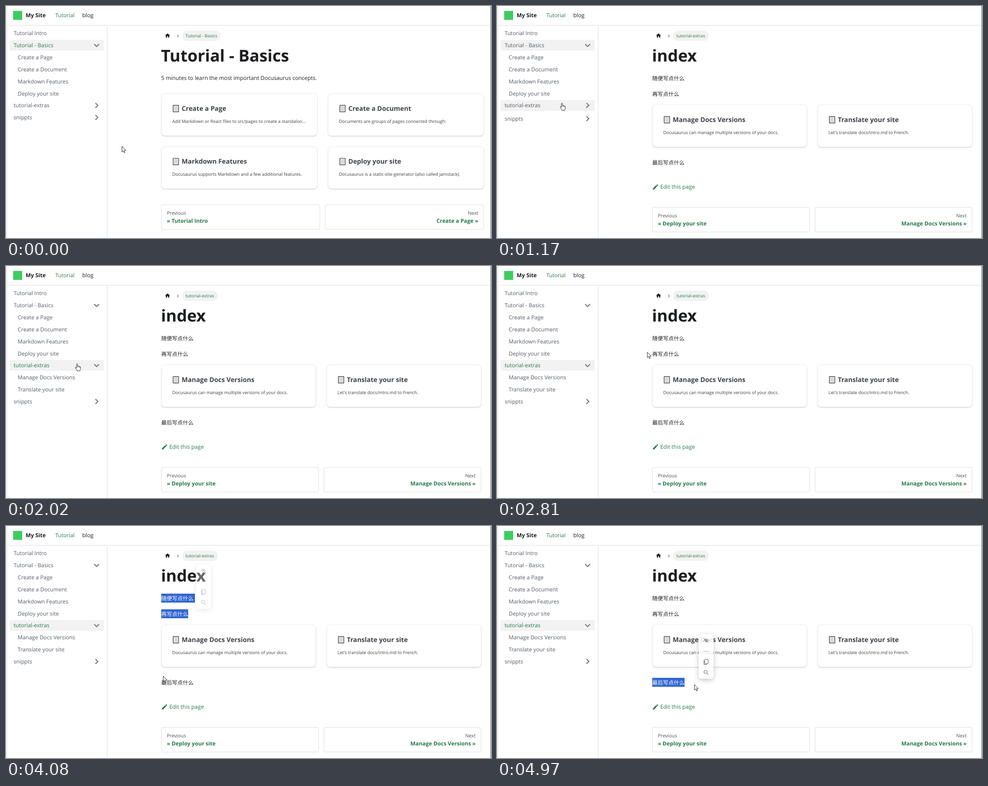
These frames come from a looping animation (1081 px wide and 518 px high, 5.02 s). An HTML page with a canvas:

```html
<!DOCTYPE html>
<html lang="zh-CN">
<head>
<meta charset="utf-8">
<title>My Site</title>
<style>
  html, body { margin: 0; width: 100%; height: 100%; overflow: hidden; background: #fff; }
  canvas { display: block; width: 1081px; height: 518px; }
</style>
</head>
<body>
<canvas id="stage" width="1081" height="518"></canvas>
<script>
const ctx = document.getElementById('stage').getContext('2d');
const LOOP = 5020, CLICK = 1170;
const FAMILY = '"Open Sans", "Noto Sans", "Noto Sans CJK SC", "Noto Sans CJK", sans-serif';
const GREEN = '#267a4b', GREY = '#555c65', INK = '#1c1e21', PALE = '#f2f2f2', LINE = '#dadde1';
const ROW = 26.83;

const HOME = new Path2D('M10 19v-5h4v5c0 .55.45 1 1 1h3c.55 0 1-.45 1-1v-7h1.7c.46 0 .68-.57.33-.87L12.67 3.6c-.38-.34-.96-.34-1.34 0l-8.36 7.53c-.34.3-.13.87.33.87H5v7c0 .55.45 1 1 1h3c.55 0 1-.45 1-1z');
const PENCIL = new Path2D('M3 17.25V21h3.75L17.81 9.94l-3.75-3.75zM20.71 7.04a1 1 0 0 0 0-1.41l-2.34-2.34a1 1 0 0 0-1.41 0l-1.83 1.83 3.75 3.75z');
const ARROW = new Path2D('M.5 .5V13L3.4 10.2L5.3 14.7L7.2 13.9L5.4 9.5H9.2Z');
const HAND = new Path2D('M4 10.5V2.2C4 .2 6.4 .2 6.4 2.2V6.4C6.9 5.6 8.6 5.8 8.7 7C9.3 6.3 10.7 6.5 10.8 7.7C11.5 7.1 12.7 7.4 12.7 8.7V12C12.7 14 11.6 14.6 11.6 16.8H5.2C5.2 14.6 3 13.2 1.3 10.6C.6 9.4 2 8.3 3 9.3Z');

const pages = {
  basics: {
    crumb: 'Tutorial - Basics', title: 'Tutorial - Basics', pill: 86,
    cols: [346.5, 717.9], cardW: 347,
    cards: [
      [0, 195.5, 'Create a Page', 'Add Markdown or React files to src/pages to create a standalon…'],
      [1, 195.5, 'Create a Document', 'Documents are groups of pages connected through:'],
      [0, 313.8, 'Markdown Features', 'Docusaurus supports Markdown and a few additional features.'],
      [1, 313.8, 'Deploy your site', 'Docusaurus is a static-site-generator (also called Jamstack).']
    ],
    nav: { y: 443.8, w: 353, x: 711.8, prev: 'Tutorial Intro', next: 'Create a Page' }
  },
  extras: {
    crumb: 'tutorial-extras', title: 'index', pill: 79.5,
    cols: [346.5, 714.8], cardW: 344.2,
    cards: [
      [0, 220.5, 'Manage Docs Versions', 'Docusaurus can manage multiple versions of your docs.'],
      [1, 220.5, 'Translate your site', "Let's translate docs/intro.md to French."]
    ],
    nav: { y: 449.6, w: 350.2, x: 708.8, prev: 'Deploy your site', next: 'Manage Docs Versions' }
  }
};

// time, x, y
const path = [
  [0, 258, 313], [50, 258, 313], [560, 153, 247], [610, 150, 244], [800, 139.5, 216],
  [1300, 139.5, 216], [1590, 152, 217], [1980, 152, 217], [2020, 153, 217], [2530, 284, 322],
  [2580, 284, 324], [2810, 334.5, 192], [3090, 346, 157], [3140, 346, 160], [3470, 412, 199],
  [3660, 412, 199], [4080, 350, 334.5], [4220, 348, 347], [4270, 347, 348], [4600, 422, 352],
  [4780, 440, 358], [4880, 439.5, 353.5], [LOOP, 439.5, 353.5]
];

const clamp = v => Math.max(0, Math.min(1, v));
const smooth = v => { v = clamp(v); return v * v * (3 - 2 * v); };

function text(s, x, y, size, color, weight = 400, align = 'left') {
  ctx.font = `${weight} ${size}px ${FAMILY}`;
  ctx.textAlign = align;
  ctx.fillStyle = color;
  ctx.fillText(s, x, y);
}

function box(x, y, w, h, r, fill, stroke) {
  ctx.beginPath();
  ctx.roundRect(x, y, w, h, r);
  if (fill) { ctx.fillStyle = fill; ctx.fill(); }
  if (stroke) { ctx.strokeStyle = stroke; ctx.lineWidth = 1; ctx.stroke(); }
}

function at(x, y, draw, scale = 1, angle = 0) {
  ctx.save();
  ctx.translate(x, y);
  ctx.rotate(angle);
  ctx.scale(scale, scale);
  draw();
  ctx.restore();
}

function poly(points, color, width) {
  ctx.beginPath();
  points.forEach(([x, y]) => ctx.lineTo(x, y));
  ctx.strokeStyle = color;
  ctx.lineWidth = width;
  ctx.stroke();
}

// Shadow outside the box only, so that translucent panels stay white.
function shadow(x, y, w, h, r, color, blur, drop) {
  ctx.save();
  ctx.beginPath();
  ctx.rect(0, 0, 1081, 518);
  ctx.roundRect(x, y, w, h, r);
  ctx.clip('evenodd');
  ctx.shadowColor = color;
  ctx.shadowBlur = blur;
  ctx.shadowOffsetY = drop;
  box(x, y, w, h, r, '#fff');
  ctx.restore();
}

function cursorAt(t) {
  const i = path.findIndex(k => k[0] > t);
  const [t0, x0, y0] = path[i - 1], [t1, x1, y1] = path[i];
  const u = (t - t0) / (t1 - t0);
  return { x: x0 + (x1 - x0) * u, y: y0 + (y1 - y0) * u };
}

function frameLines() {
  ctx.fillStyle = '#fff';
  ctx.fillRect(0, 0, 1081, 518);
  ctx.fillStyle = '#e3e4e6';
  ctx.fillRect(1, 0, 1.5, 518);
  ctx.fillRect(2, 42.5, 1077, 1.3);
  ctx.fillStyle = LINE;
  ctx.fillRect(225, 43, 1, 475);
  ctx.fillStyle = '#55585c';
  ctx.fillRect(1080, 0, 1, 518);
}

function navbar() {
  ctx.fillStyle = '#3ecc5f';
  ctx.fillRect(16, 11, 20, 20);
  text('My Site', 43.7, 25.2, 12.25, INK, 700);
  text('Tutorial', 110, 25.2, 12.1, GREEN);
  text('blog', 170, 25.2, 12.4, INK);
}

function highlight(y, alpha) {
  ctx.globalAlpha = alpha;
  box(8, y - 12.3, 210, 24.4, 3, PALE);
  ctx.globalAlpha = 1;
}

function chevron(y, angle) {
  at(202, y, () => poly([[-5.4, -2.7], [0, 2.7], [5.4, -2.7]], '#73787e', 2.2), 1, angle);
}

function sidebar(t, cur) {
  const rowY = i => 61 + ROW * i;
  const row = (s, x, y, color = GREY) => text(s, x, y + 4.4, 12.2, color);
  const clicked = t >= CLICK;
  const open = clicked ? smooth((t - 1125) / 340) : 0;
  const tint = clamp((t - CLICK) / 200);
  const last = rowY(7) + 2 * ROW * open;
  const hover = y => cur.x < 215 && Math.abs(cur.y + 2 - y) < 12.5;

  if (tint < 1) highlight(rowY(1), 1 - tint);
  if (clicked || hover(rowY(6))) highlight(rowY(6), 1);
  if (hover(last)) highlight(last, 1);

  row('Tutorial Intro', 17, rowY(0));
  row('Tutorial - Basics', 17, rowY(1), clicked ? GREY : GREEN);
  ['Create a Page', 'Create a Document', 'Markdown Features', 'Deploy your site']
    .forEach((s, i) => row(s, 26, rowY(2 + i)));
  if (tint < 1) row('tutorial-extras', 17, rowY(6));
  if (tint > 0) {
    ctx.globalAlpha = tint;
    row('tutorial-extras', 17, rowY(6), GREEN);
    ctx.globalAlpha = 1;
  }
  if (open > 0) {
    ctx.save();
    ctx.beginPath();
    ctx.rect(8, rowY(6) + 13.4, 210, 2 * ROW * open);
    ctx.clip();
    row('Manage Docs Versions', 26, rowY(7));
    row('Translate your site', 26, rowY(8));
    ctx.restore();
  }
  row('snippts', 17, last);
  chevron(rowY(1), 0);
  chevron(rowY(6), (open - 1) * Math.PI / 2);
  chevron(last, -Math.PI / 2);
}

function docIcon(x, y) {
  at(x, y, () => {
    box(1, .8, 12.2, 14.6, .6, '#ececec');
    ctx.strokeStyle = '#2b2b2b';
    ctx.lineWidth = 1.2;
    ctx.stroke();
    for (let i = 0; i < 5; i++) poly([[3.2, 3.6 + i * 2.2], [11, 3.6 + i * 2.2]], '#c2c2c2', 1);
  });
}

function card(x, y, w, title, desc) {
  shadow(x, y, w, 94, 8, 'rgba(0,0,0,.2)', 3, 1.5);
  box(x, y, w, 94, 8, '#fff', '#ebecee');
  docIcon(x + 25, y + 25.4);
  text(title, x + 45, y + 38.4, 14.6, '#3f434a', 700);
  text(desc, x + 24, y + 65, 9.88, '#3a3f46');
}

function pager({ y, w, x, prev, next }) {
  const right = x + w - 12.2;
  box(346.5, y, w, 55, 3.5, null, LINE);
  box(x, y, w, 55, 3.5, null, LINE);
  text('Previous', 358.5, y + 22.2, 10.75, '#4a5058');
  text('« ' + prev, 358.5, y + 40, 12.15, GREEN, 700);
  text('Next', right, y + 22.2, 10.75, '#4a5058', 400, 'right');
  text(next + ' »', right, y + 40, 12.15, GREEN, 700, 'right');
}

function selectable(s, y, selW) {
  const draw = color => text(s, 346, y + 4.5, 12, color);
  if (selW < 60) draw(INK);
  if (selW <= 0) return;
  ctx.save();
  ctx.beginPath();
  ctx.rect(346, y - 10, selW, 20);
  ctx.clip();
  ctx.fillStyle = '#3367d1';
  ctx.fillRect(346, y - 10, selW, 20);
  draw('#fff');
  ctx.restore();
  if (selW < 60) return;
  // Keep any unselected tail of the line dark.
  ctx.save();
  ctx.beginPath();
  ctx.rect(346 + selW, y - 10, 80, 20);
  ctx.clip();
  draw(INK);
  ctx.restore();
}

function paragraphs(t, cur) {
  const drag = max => Math.max(0, Math.min(max, cur.x - 346));
  let first = 0, second = 0, third = 0;
  if (t >= 3140 && t < 4270) {
    const below = t >= 3470 || cur.y > 178;
    first = below ? 75 : drag(72);
    second = t >= 3470 ? 60 : below ? drag(60) : 0;
  }
  if (t >= 4270) third = t > 4600 ? 72 : drag(72);
  selectable('随便写点什么', 161, first);
  selectable('再写点什么', 196, second);
  selectable('最后写点什么', 349, third);
}

function content(t, cur) {
  const page = t < CLICK ? pages.basics : pages.extras;
  ctx.fillStyle = INK;
  at(353.4, 59.4, () => ctx.fill(HOME), .555);
  poly([[381.5, 64], [384.5, 67], [381.5, 70]], '#70757b', 1.1);
  box(392.5, 55, page.pill, 23, 11.5, PALE);
  text(page.crumb, 400, 70, 9.75, GREEN);
  text(page.title, 345.5, 123.6, 36.4, INK, 700);
  page.cards.forEach(([col, y, title, desc]) => card(page.cols[col], y, page.cardW, title, desc));
  pager(page.nav);
  if (page === pages.basics) {
    text('5 minutes to learn the most important Docusaurus concepts.', 346, 165, 12.22, INK);
  } else {
    paragraphs(t, cur);
    ctx.fillStyle = GREEN;
    at(345.7, 396.2, () => ctx.fill(PENCIL), .64);
    text('Edit this page', 364, 408, 12.3, GREEN);
  }
}

function toolbar(x, y, alpha) {
  const ink = '#33363a';
  ctx.save();
  ctx.globalAlpha = alpha;
  shadow(x, y, 33, 99, 6, 'rgba(0,0,0,.28)', 12, 3);
  box(x, y, 33, 99, 6, '#fff');
  at(x + 16.5, y + 13.5, () => {
    ctx.beginPath();
    ctx.arc(0, 3.5, 5.8, Math.PI * 1.1, Math.PI * 1.9);
    ctx.moveTo(2, 1.5);
    ctx.arc(0, 1.5, 2, 0, Math.PI * 2);
    ctx.strokeStyle = ink;
    ctx.lineWidth = 1;
    ctx.stroke();
    poly([[-5, -5], [5, 5]], ink, 1);
  });
  ctx.fillStyle = ink;
  for (const dx of [-4, 0, 4]) ctx.fillRect(x + 15.9 + dx, y + 37, 1.3, 1.3);
  box(x + 13.5, y + 55.5, 7.5, 10, 1.5, null, ink);
  poly([[x + 11.8, y + 57.5], [x + 11.8, y + 67.3], [x + 18.5, y + 67.3]], ink, 1);
  ctx.beginPath();
  ctx.arc(x + 15.3, y + 83.8, 3.6, 0, Math.PI * 2);
  ctx.stroke();
  poly([[x + 18, y + 86.5], [x + 22, y + 90.3]], ink, 1);
  ctx.restore();
}

function miniMenu(t, cur) {
  if (t >= 3700 && t < 4270) {
    const far = clamp((Math.hypot(cur.x - 440, cur.y - 185) - 30) / 120);
    toolbar(423.8, 86, clamp((t - 3640) / 160) * (.85 - .52 * far));
  } else if (t >= 4880) {
    toolbar(449.5, 242, .45 + .4 * clamp((t - 4880) / 90));
  }
}

function pointer(t, { x, y }) {
  const beam = t > 3060 && t < 3720 || t > 4180 && t < 4880;
  if (beam) {
    at(x, y, () => {
      poly([[-2.5, -6], [2.5, -6]], '#222', 1);
      poly([[0, -6], [0, 6]], '#222', 1.2);
      poly([[-2.5, 6], [2.5, 6]], '#222', 1);
    });
    return;
  }
  const hand = x < 217 && y > 205 && y < 260;
  at(x, y, () => {
    ctx.fillStyle = '#fff';
    ctx.strokeStyle = '#222';
    ctx.lineWidth = 1;
    ctx.lineJoin = 'round';
    const shape = hand ? HAND : ARROW;
    ctx.fill(shape);
    ctx.stroke(shape);
    if (hand) {
      poly([[6.4, 6.4], [6.4, 9]], '#222', .8);
      poly([[8.7, 7], [8.7, 9.3]], '#222', .8);
      poly([[10.8, 7.7], [10.8, 9.6]], '#222', .8);
    }
  });
}

function draw(t) {
  const cur = cursorAt(t);
  frameLines();
  navbar();
  sidebar(t, cur);
  content(t, cur);
  miniMenu(t, cur);
  pointer(t, cur);
}

const start = performance.now();
function tick() {
  draw((performance.now() - start) % LOOP);
  requestAnimationFrame(tick);
}
ctx.textRendering = 'geometricPrecision';
tick();
</script>
</body>
</html>
```
